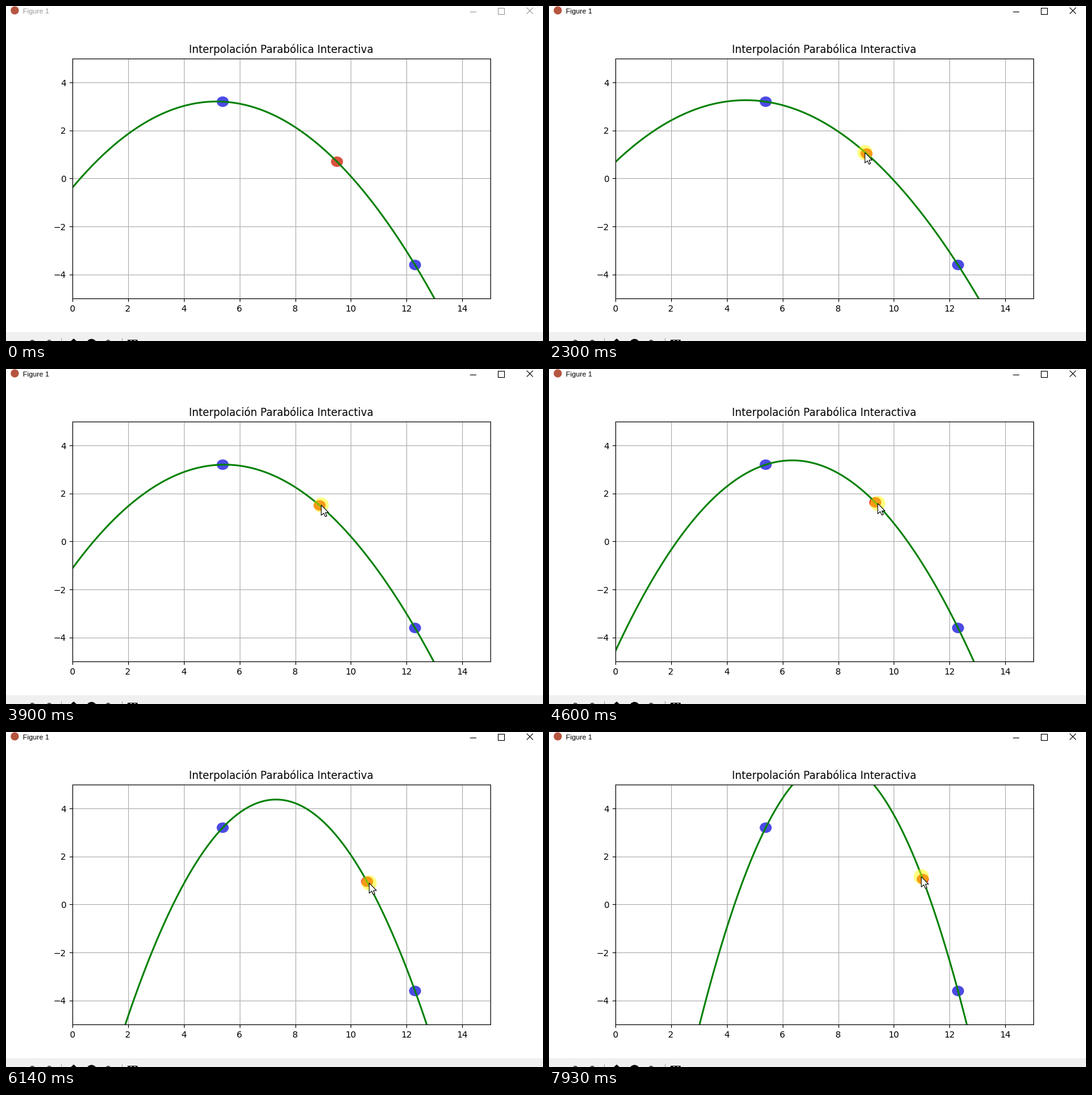
Animation of 857x535 px, one loop 8000 ms. Source, as a matplotlib script:

```python
import numpy as np
import matplotlib.pyplot as plt
from matplotlib.animation import FuncAnimation
from matplotlib.patches import Circle, Polygon, Rectangle

W, H, DPI = 857, 535, 100
STEP, LOOP = 50, 8000

# The plot canvas sits inside the window; the axes use the default margins.
CANVAS_W, CANVAS_H, CANVAS_X, CANVAS_Y = 861, 498, -2, 13
LEFT, BASE = CANVAS_X + 0.125 * CANVAS_W, CANVAS_Y + 0.11 * CANVAS_H
WIDTH, HEIGHT = 0.775 * CANVAS_W, 0.77 * CANVAS_H

GREEN, BLUE = "#008000", "#4b4be4"
RED, RED_GRABBED = "#d9523f", "#f2372d"
GREY, PALE = "#999999", "#f0f0f0"
START, MID, END = (5.4, 3.2), (9.5, 0.7), (12.3, -3.6)

# The handle trails the pointer by LAG along one drag path: (ms, x, y).
ENTER, GRAB, DRAG, LAG = 250, 1200, 1550, 90
DRAG_PATH = np.array([
    (ENTER + LAG, 13.83, -4.05),
    (870 + LAG, 9.43, 0.56),
    (GRAB + LAG, 9.43, 0.56),
    (DRAG, *MID),
    (3140, 8.5, 1.4),
    (3340, 8.5, 1.4),
    (4620, 9.33, 1.63),
    (5790, 10.5, 1.05),
    (6120, 10.58, 0.95),
    (7100, 11.41, 0.36),
    (7300, 11.41, 0.36),
    (LOOP + 20, 10.975, 1.17),
])


def path(t):
    ms, x, y = DRAG_PATH.T
    return np.interp(t, ms, x), np.interp(t, ms, y)


def to_pixels(point):
    x, y = point
    return LEFT + x / 15 * WIDTH, H - BASE - (y + 5) / 10 * HEIGHT


def parabola(x, mid):
    """Newton form of the parabola through START, mid and END."""
    (x0, y0), (x1, y1), (x2, y2) = START, mid, END
    s1, s2 = (y1 - y0) / (x1 - x0), (y2 - y1) / (x2 - x1)
    a = (s2 - s1) / (x2 - x0)
    return y0 + s1 * (x - x0) + a * (x - x0) * (x - x1)


fig = plt.figure(figsize=(W / DPI, H / DPI), dpi=DPI, facecolor="white")

# Plot
ax = fig.add_axes([LEFT / W, BASE / H, WIDTH / W, HEIGHT / H])
ax.set_xlim(0, 15)
ax.set_ylim(-5, 5)
ax.set_xticks(range(0, 15, 2))
ax.set_yticks(range(-4, 5, 2))
ax.grid(True)
ax.set_title("Interpolación Parabólica Interactiva")


def add_point(centre, color):
    return ax.add_patch(Circle(centre, 0.2, color=color, lw=1))


add_point(START, BLUE)
add_point(END, BLUE)
handle = add_point(MID, RED)
xs = np.linspace(0, 15, 400)
curve, = ax.plot(xs, parabola(xs, MID), color=GREEN, lw=2)

# Window frame, in pixels from the top left
ui = fig.add_axes([0, 0, 1, 1], zorder=5)
ui.set_xlim(0, W)
ui.set_ylim(H, 0)
ui.axis("off")


def stroke(x, y, color="black", lw=0.75):
    return ui.plot(x, y, color=color, lw=lw, solid_capstyle="butt")[0]


def box(x, y, w, h, color="black"):
    ui.add_patch(Rectangle((x, y), w, h, fc=color, lw=0))


def disc(x, y, r, color="black", **style):
    return ui.add_patch(Circle((x, y), r, fc=color, lw=0, **style))


disc(14, 7, 6.5, "#b5553f")
caption = ui.text(27, 12, "Figure 1", family="Liberation Sans", size=8.2)
buttons = [
    stroke([740, 750], [9, 9]),
    stroke([785, 795, 795, 785, 785], [3, 3, 13, 13, 3]),
    stroke([831, 841], [2.5, 12.5]),
    stroke([831, 841], [12.5, 2.5]),
]

# Toolbar, cut off by the lower edge
box(0, 521, W, 14, PALE)
for x in (88, 185):
    stroke([x, x], [530, H], "#a0a0a0")
for x in (42, 69, 163):
    stroke([x - 3, x, x + 3], [H, 533.5, H], "#303030", 1)
ui.add_patch(Polygon([(102.5, 536), (108, 531), (113.5, 536)], fc="black", lw=0))
disc(136.5, 540, 8.3)
box(194, 532.5, 16.5, 3)
for x in (198, 204.5):
    box(x, 533.5, 3, 2, PALE)

# Pointer
halo = disc(0, 0, 12, "#ffff00", alpha=0.5, zorder=6)
ARROW = np.array([(0, 0), (0, 16.5), (4, 13), (6.5, 18.6), (9, 17.5),
                  (6.6, 12), (11.6, 12)])
arrow = ui.add_patch(Polygon(ARROW, fc="white", ec="black", lw=0.75, zorder=7))


def draw(i):
    t = (i + 0.4) * STEP
    grabbed = t >= GRAB
    mid = path(max(t, DRAG))
    handle.center = mid
    handle.set_color(RED_GRABBED if grabbed else RED)
    curve.set_ydata(parabola(xs, mid))

    tip = to_pixels(path(t + LAG))
    arrow.set_xy(ARROW + tip)
    arrow.set_visible(t >= ENTER)
    halo.center = tip
    halo.set_visible(grabbed)

    for item in (caption, *buttons):
        item.set_color("black" if grabbed else GREY)
    return handle, curve, arrow, halo, caption, *buttons


anim = FuncAnimation(fig, draw, frames=LOOP // STEP, interval=STEP, repeat=True)
plt.show()
```
